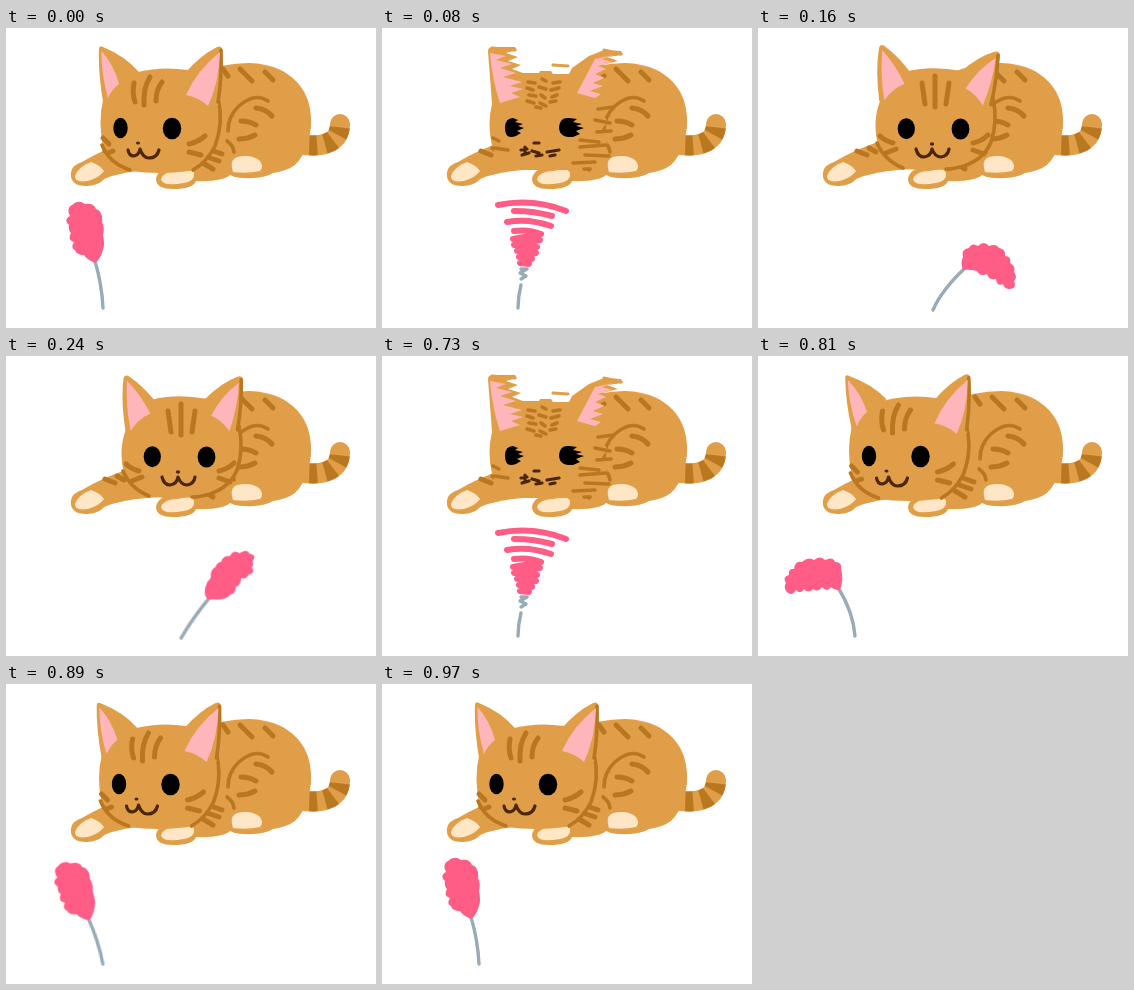
Write an HTML page that moves like this. It is 370 by 300 pixels and loops after 1.3 s.

```html
<!DOCTYPE html>
<html lang="en">
<head>
<meta charset="utf-8">
<title>Cat and feather</title>
<style>
  html, body { margin: 0; width: 100%; height: 100%; overflow: hidden; background: #fff; }
  svg { display: block; width: 100vw; height: 100vh; }
  .fur { fill: #e19e48; }
  .cream { fill: #ffe6c7; }
  .pink { fill: #ffb6ba; }
  .plume { fill: #ff5c86; }
  .line { fill: none; stroke: #b97720; stroke-width: 5; stroke-linecap: round; stroke-linejoin: round; }
  .edge { stroke-width: 3.6; }
  .mouth { stroke: #4b2605; stroke-width: 3.2; }
  .stick { stroke: #9aabb8; stroke-width: 3.4; }
  .swish { stroke: #ff5c86; stroke-width: 6; }

  .pose { opacity: 0; animation: 1300ms step-end infinite; }
  #left { animation-name: left; }
  #blur { animation-name: blur; }
  #right-far { animation-name: right-far; }
  #right-back { animation-name: right-back; }
  #right { animation-name: right; }
  #left-far { animation-name: left-far; }
  #left-back { animation-name: left-back; }

  @keyframes left { 0%, 74.6153% { opacity: 1; } 6.1538% { opacity: 0; } 100% { opacity: 1; } }
  @keyframes blur { 0%, 12.3076%, 62.3076% { opacity: 0; } 6.1538%, 56.1538% { opacity: 1; } }
  @keyframes right-far { 0%, 18.4615% { opacity: 0; } 12.3076% { opacity: 1; } }
  @keyframes right-back { 0%, 24.6153% { opacity: 0; } 18.4615% { opacity: 1; } }
  @keyframes right { 0%, 56.1538% { opacity: 0; } 24.6153% { opacity: 1; } }
  @keyframes left-far { 0%, 68.4615% { opacity: 0; } 62.3076% { opacity: 1; } }
  @keyframes left-back { 0%, 74.6153% { opacity: 0; } 68.4615% { opacity: 1; } }
</style>
</head>
<body>
<svg viewBox="0 0 370 300">
  <defs>
    <!-- head turned left -->
    <g id="l-face">
      <path class="fur" d="M97 72Q108 53 132 44Q156 38 182 42L212 68Q219 92 209 119Q200 137 184 143Q152 147 124 143Q104 135 97 118Q92 94 97 72Z"/>
      <path class="line edge" d="M212 70Q218 94 209 118Q201 134 187 142M96 117Q103 135 124 142"/>
      <path class="line" d="M128 55Q126 65 129 74M144 49Q137 60 138 77M156 54Q150 62 150 73M97 110L103 116M102 125L107 123M183 116Q192 114 199 108M183 124L195 127"/>
      <ellipse cx="114.5" cy="100" rx="7.2" ry="10.3"/>
      <ellipse cx="166" cy="100.5" rx="9.2" ry="10.8"/>
      <ellipse cx="132" cy="115" rx="2" ry="1.6" fill="#4b2605"/>
      <path class="line mouth" d="M122 122Q123 128 128 128Q133 127 134 121Q137 130 143 130Q151 130 153 122"/>
    </g>
    <g id="l-ear1">
      <path class="fur" d="M93 21Q93 17 97 19Q119 28 133 44L112 72L97 74Q92 44 93 21Z"/>
      <path class="pink" d="M95.500 23Q108 37 113 56Q106 61 102 70Q95 46 95.500 23Z"/>
    </g>
    <g id="l-ear2">
      <path class="fur" d="M181 43Q195 27 211 19Q216 17 216 22Q217 50 212 78L184 66Z"/>
      <path class="line edge" d="M215 22Q216 50 212 74"/>
      <path class="pink" d="M214 24Q191 42 180 67Q194 70 202 78Q213 55 214 24Z"/>
    </g>

    <!-- head turned right -->
    <g id="r-face">
      <path class="fur" d="M118 73Q124 54 143 44Q167 37 200 43L230 68Q237 92 230 114Q222 132 202 139Q172 145 140 140Q122 132 116 117Q110 94 118 73Z"/>
      <path class="line edge" d="M231 70Q236 94 229 114Q222 131 202 138Q192 141 184 141M115 115Q122 132 141 140"/>
      <path class="line" d="M160 55L163 76M173 48V79M187 55L184 76M118 108Q123 113 131 115M124 125L134 121M211 115Q220 113 226 107M211 122L222 126"/>
      <ellipse cx="144.300" cy="100.700" rx="8.600" ry="10.500"/>
      <ellipse cx="198.500" cy="101" rx="8.900" ry="10.600"/>
      <ellipse cx="170" cy="116" rx="2.200" ry="1.800" fill="#4b2605"/>
      <path class="line mouth" d="M154 121Q156 129 162 129Q169 128 170 121Q173 129 179 129Q186 128 187 121"/>
    </g>
    <g id="r-ear1">
      <path class="fur" d="M114 23Q115 18 120 21Q134 30 146 44L130 74L118 76Q112 46 114 23Z"/>
      <path class="pink" d="M117.500 25Q132 39 142 57Q130 63 123 75Q117 50 117.500 25Z"/>
    </g>
    <g id="r-ear2">
      <path class="fur" d="M196 44Q211 27 227 20Q232 18 233 23Q234 50 230 76L206 64Z"/>
      <path class="line edge" d="M231 23Q233 48 230 73"/>
      <path class="pink" d="M229 26Q212 40 203 60Q215 65 222 75Q229 50 229 26Z"/>
    </g>

    <g id="l-feather">
      <path class="line stick" d="M89 233Q96 257 97 280"/>
      <path class="plume" d="M89 235Q80 231 78 227Q70 227 69 222Q64 220 68 214Q61 212 65 205Q62 203 63 197Q57 192 64 188Q60 180 66 177Q72 171 79 176Q88 175 90 181Q97 183 96 194Q99 199 97 207Q99 216 97 222Q94 232 89 235Z"/>
    </g>
    <g id="r-feather">
      <path class="line stick" d="M175 282Q184 260 197 239"/>
      <path class="plume" d="M196 240Q191 237 192 228Q193 222 196 218Q194 211 199 207Q200 202 204 201Q205 194 212 194Q214 187 221 190Q228 184 231 189Q239 189 235 196Q237 200 235 202Q240 207 233 210Q232 215 226 214Q227 221 222 224Q223 230 218 232Q214 238 205 239Z"/>
    </g>
  </defs>

  <!-- body -->
  <path class="line" style="stroke:#e19e48;stroke-width:20" d="M298 117C319 119 334 114 334 96"/>
  <path class="line" style="stroke-width:20;stroke-linecap:butt" stroke-dasharray="0 5 8 8 9 7 8 60" d="M298 117C319 119 334 114 334 96"/>
  <path class="fur" d="M190 46Q216 35 243 35Q278 36 295 59Q306 74 305 98Q303 123 289 137Q281 143 267 145Q258 151 238 150Q229 150 224 147Q216 154 190 153Q187 161 167 161Q150 161 150 151Q151 144 158 141Q126 142 106 148Q98 150 95 154Q85 160 72 157Q62 152 66 141Q68 137 76 134Q96 122 120 114Z"/>
  <path class="cream" d="M69 148Q72 139 85 134Q94 137 98 143Q93 150 82 153Q68 155 69 148Z"/>
  <path class="cream" d="M155 151Q158 143 172 143Q185 138 188 145Q189 153 178 155Q156 159 155 151Z"/>
  <path class="cream" d="M226 140Q224 132 231 129Q246 126 254 133Q258 139 254 143Q241 146 227 144Z"/>
  <path class="line" d="M234 41L246 53M217 41L222 48M259 44L267 52M250 80Q260 81 266 88M235 93Q243 93 250 97M233 111Q242 111 249 107M99 123L109 127M111 120L118 124M205 122L216 126M201 129L213 133M197 135L207 141"/>
  <path class="line edge" d="M222 103Q222 88 233 78Q249 64 262 73M221 113Q227 117 228 124"/>

  <g class="pose" id="left">
    <use href="#l-face"/><use href="#l-ear1"/><use href="#l-ear2"/>
    <use href="#l-feather"/>
  </g>

  <g class="pose" id="left-far">
    <g transform="translate(-3.500 0)">
      <use href="#l-face"/>
      <use href="#l-ear1" transform="rotate(-3 113 65)"/>
      <use href="#l-ear2" transform="rotate(-1 196 65)"/>
    </g>
    <path class="line stick" d="M81 233Q95 256 97 280"/>
    <path class="plume" d="M82 234Q77 235 73 231Q69 237 64 231Q60 237 55 233Q50 238 46 233Q43 239 38 234Q34 241 29 236Q25 232 28 227Q24 221 31 219Q30 212 36 213Q37 204 44 206Q50 200 56 204Q62 199 67 204Q75 200 77 206Q84 206 83 213Q86 224 82 234Z"/>
  </g>

  <g class="pose" id="left-back">
    <g transform="translate(-1.500 0)">
      <use href="#l-face"/>
      <use href="#l-ear1" transform="rotate(-1 113 65)"/><use href="#l-ear2"/>
    </g>
    <use href="#l-feather" transform="rotate(-8 97 281)"/>
  </g>

  <g class="pose" id="right-far">
    <g transform="translate(4 0)">
      <use href="#r-face"/>
      <use href="#r-ear1" transform="translate(0 -2) rotate(4 130 65)"/>
      <use href="#r-ear2" transform="translate(0 2) rotate(7 215 65)"/>
    </g>
    <path class="line stick" d="M175 282Q183 263 206 241"/>
    <path class="plume" d="M205 242Q202 235 205 229Q203 221 211 220Q214 214 220 218Q226 212 231 218Q238 215 241 220Q248 221 247 228Q254 229 252 235Q258 238 256 244Q260 249 256 253Q259 260 252 261Q246 261 245 256Q239 259 238 251Q231 253 229 246Q222 249 219 243Q211 241 205 242Z"/>
  </g>

  <g class="pose" id="right-back">
    <g transform="translate(2 0)">
      <use href="#r-face"/>
      <use href="#r-ear1" transform="rotate(2 130 65)"/>
      <use href="#r-ear2" transform="rotate(3 215 65)"/>
    </g>
    <use href="#r-feather" transform="rotate(8 175 283)"/>
  </g>

  <g class="pose" id="right">
    <use href="#r-face"/><use href="#r-ear1"/><use href="#r-ear2"/>
    <use href="#r-feather"/>
  </g>

  <!-- smeared turn -->
  <g class="pose" id="blur">
    <path class="fur" d="M110 76L106 23Q106 19 111 19H133L135 22L124 25L136 29L126 33L139 37L130 41L141 45H157L158 43H169L171 46H187L190 40L207 28L222 22L239 23L241 27L225 29L236 33L220 37L232 42L218 47L228 54L216 60L225 70L219 84L226 94L217 104L226 116L218 128L222 138L202 142H135Q116 135 110 118Q105 96 110 76Z"/>
    <path class="pink" d="M108 25L124 28L114 32L130 36L118 40L134 45L121 49L140 54L128 58L141 61L129 65L138 69L118 75Q110 51 108 25Z"/>
    <path class="pink" d="M232 27L213 31L195 65L213 70L219 66L208 63L221 58L211 55L222 50L213 46L224 41L216 38L230 34L220 31Z"/>
    <path class="line" style="stroke:#e19e48;stroke-width:3" d="M171 37L186 38M110 20L133 22M222 22L239 26"/>
    <path class="line edge" d="M146 54L153 55M160 51L164 53M171 55L178 54M145 60L151 62M157 59L164 61M169 62L177 60M147 67L154 68M159 67L163 70M170 69L175 67M145 73L152 75M158 75L164 78M168 74L174 73M154 79L159 80"/>
    <path class="line edge" d="M111 110L117 113M112 120L126 122M198 112L217 114M198 119L224 117M203 127L227 128M191 135L213 134M202 141L208 141M216 81L232 79M213 92L228 95M215 104L229 103"/>
    <path d="M123 100Q123 90 131 90L136 92L133 94L141 96L136 98L142 100L135 103L139 105L134 108Q123 112 123 100ZM177 99Q178 89 187 90L195 91L191 94L200 96L194 98L202 100L194 103L198 106L191 109Q177 110 177 99Z"/>
    <path class="line mouth" d="M152 115H157M139 122L145 121M150 123L157 125M165 124L177 122M140 127L147 125M154 128L160 127M168 128L173 127M143 119V124"/>
    <path class="line swish" d="M116 177Q151 170 184 183M132 183Q153 183 170 188M125 194Q147 190 169 198M132 203Q147 201 159 206L131 211Q146 208 158 212L132 217L155 219L135 223L154 225L137 229L150 231L138 235L147 236"/>
    <path class="line stick" d="M139 241L145 241L138 245L144 248L139 251M139 257Q136 269 136 280"/>
  </g>
</svg>
</body>
</html>
```
